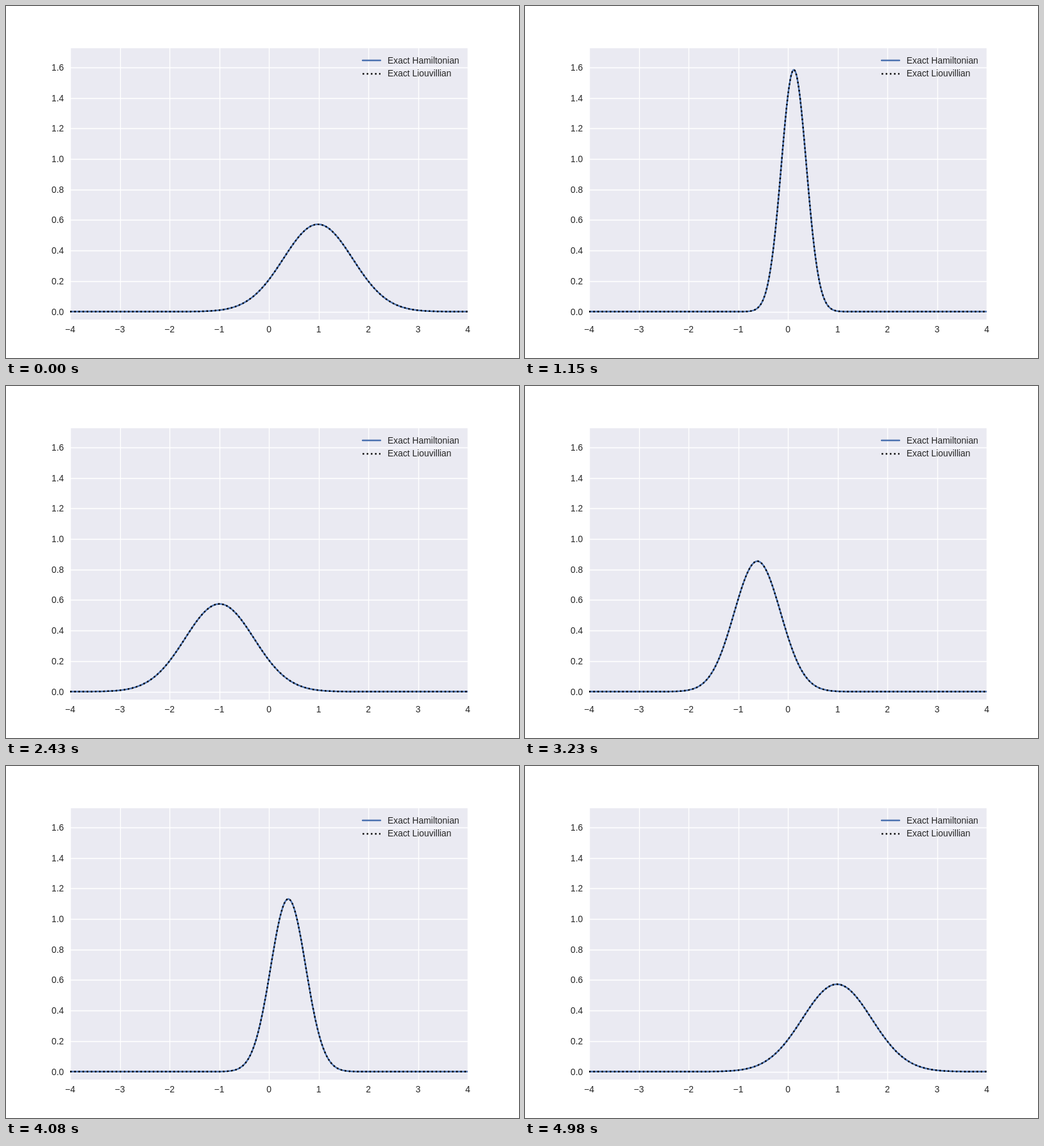
Write an HTML page with a canvas that moves like this. It is 800x550 px and loops after 5.01 s.

```html
<!DOCTYPE html>
<html lang="en">
<head>
<meta charset="utf-8">
<title>Oscillating wave packet</title>
<style>
html, body { margin: 0; width: 100%; height: 100%; overflow: hidden; background: #fff; }
canvas { display: block; }
</style>
</head>
<body>
<canvas id="stage" width="800" height="550"></canvas>
<script>
const ctx = document.getElementById('stage').getContext('2d');

const LOOP = 5010, STEPS = 200;
const BOX = { left: 100, top: 66, right: 720, bottom: 490 };
const PT = 100 / 72;
const LINE = 1.75 * PT;
const DOTS = [LINE, LINE * 1.65];
const BLUE = '#4c72b0', INK = '#262626';

const toX = x => 410 + x * 77.5;
const toY = y => 477.575 - y * 238.5;
const snap = v => Math.floor(v + 0.5) + 0.5;

function stroke(color, width, dash, cap, trace) {
  ctx.strokeStyle = color;
  ctx.lineWidth = width;
  ctx.lineCap = cap;
  ctx.lineJoin = 'round';
  ctx.setLineDash(dash);
  ctx.beginPath();
  trace();
  ctx.stroke();
}

function segment(x1, y1, x2, y2) {
  ctx.moveTo(x1, y1);
  ctx.lineTo(x2, y2);
}

function label(text, x, y, align) {
  ctx.textAlign = align;
  ctx.fillText(text, x, y);
}

function clipToBox() {
  ctx.beginPath();
  ctx.rect(BOX.left, BOX.top, BOX.right - BOX.left, BOX.bottom - BOX.top);
  ctx.clip();
}

function drawAxes() {
  ctx.fillStyle = '#fff';
  ctx.fillRect(0, 0, 800, 550);

  ctx.save();
  clipToBox();
  ctx.fillStyle = '#eaeaf2';
  ctx.fillRect(BOX.left, BOX.top, 620, 424);
  stroke('#fff', PT, [], 'butt', () => {
    for (let i = -4; i <= 4; i++) {
      const x = snap(toX(i));
      segment(x, BOX.top, x, BOX.bottom);
    }
    for (let i = 0; i <= 8; i++) {
      const y = snap(toY(i / 5));
      segment(BOX.left, y, BOX.right, y);
    }
  });
  ctx.restore();

  ctx.fillStyle = INK;
  ctx.font = 10 * PT + 'px "Liberation Sans", Arial, sans-serif';
  ctx.textBaseline = 'alphabetic';
  for (let i = -4; i <= 4; i++) {
    label(String(i).replace('-', '\u2212'), toX(i), 510, 'center');
  }
  for (let i = 0; i <= 8; i++) {
    label((i / 5).toFixed(1), 90.3, Math.round(toY(i / 5) + 5), 'right');
  }
}

function drawLegend() {
  stroke(BLUE, LINE, [], 'round', () => segment(556.1, 85, 583.9, 85));
  stroke('#000', LINE, DOTS, 'butt', () => segment(556.1, 106, 583.9, 106));
  ctx.fillStyle = INK;
  label('Exact Hamiltonian', 595, 90, 'left');
  label('Exact Liouvillian', 595, 110, 'left');
}

// Squeezed Gaussian packet swinging in a harmonic well.
function drawPacket(phase) {
  const c = Math.cos(phase), s = Math.sin(phase);
  const mean = 0.993 * c - 0.005;
  const variance = 0.486 * c * c + 0.05668 * s * s;
  const peak = 1 / Math.sqrt(2 * Math.PI * variance);
  const trace = () => {
    for (let px = BOX.left; px <= BOX.right; px++) {
      const d = (px - 410) / 77.5 - mean;
      ctx.lineTo(px, toY(peak * Math.exp(-d * d / (2 * variance))));
    }
  };
  ctx.save();
  clipToBox();
  stroke(BLUE, LINE, [], 'round', trace);
  stroke('#000', LINE, DOTS, 'butt', trace);
  ctx.restore();
}

// Steps last 30 ms and 20 ms in turn.
function stepAt(ms) {
  const step = 2 * Math.floor(ms / 50) + (ms % 50 >= 30 ? 1 : 0);
  return Math.min(step, STEPS - 1);
}

const start = performance.now();
let shown = -1;

function tick() {
  const step = stepAt((performance.now() - start) % LOOP);
  if (step !== shown) {
    shown = step;
    drawAxes();
    drawPacket(2 * Math.PI * step / STEPS);
    drawLegend();
  }
  requestAnimationFrame(tick);
}
tick();
</script>
</body>
</html>
```
